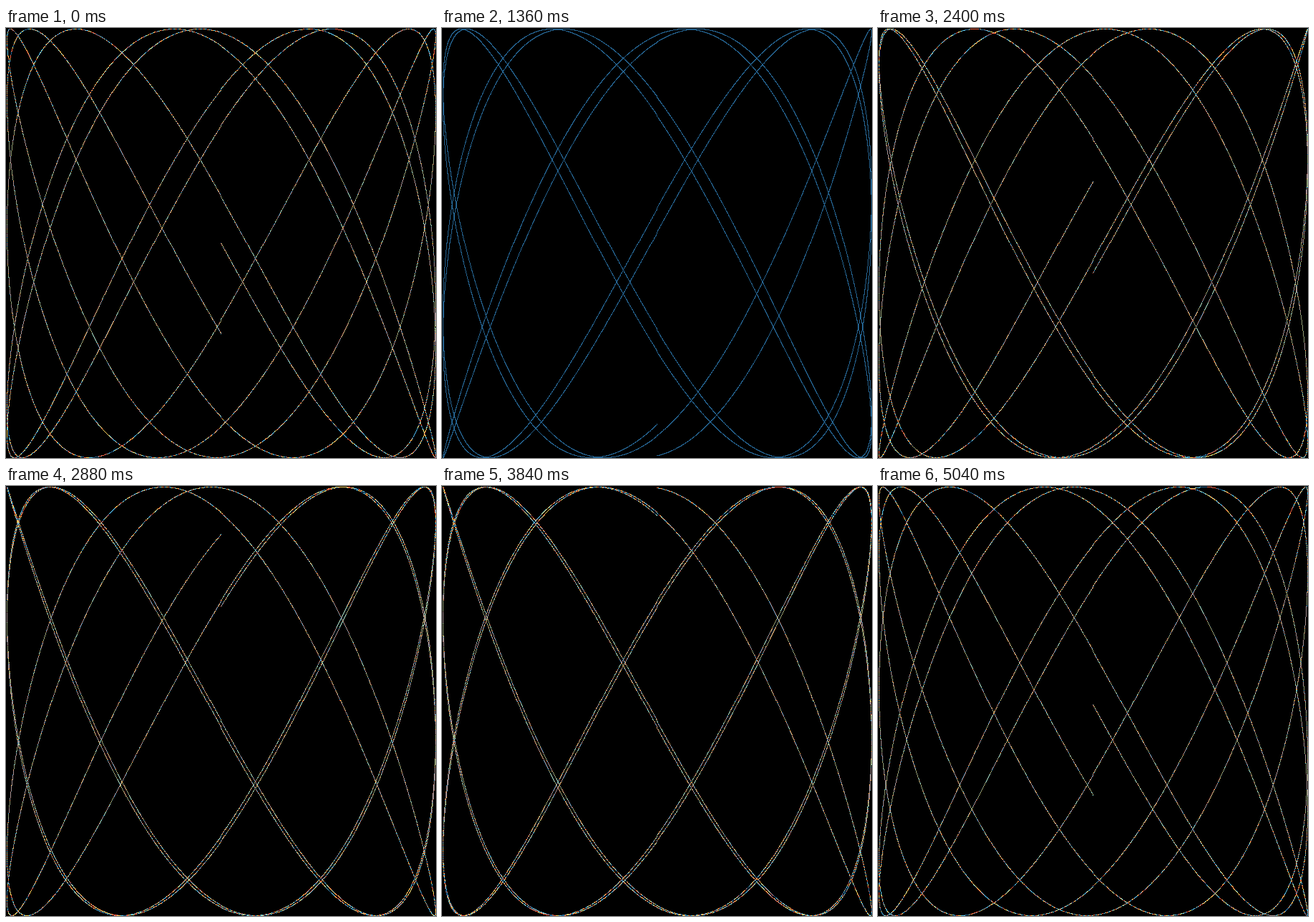
Animation of 601 by 601 pixels, one loop 5120 ms. Source, as an HTML page with a canvas:

```html
<!DOCTYPE html>
<html lang="en">
<head>
<meta charset="utf-8">
<title>Lissajous</title>
<style>
  html, body { margin: 0; width: 100%; height: 100%; overflow: hidden; background: #000; }
  canvas { display: block; }
</style>
</head>
<body>
<canvas id="stage" width="601" height="601"></canvas>
<script>
const SIZE = 300, SIDE = 2 * SIZE + 1;
const CYCLES = 5, RES = 0.001, FREQ = 1.8139808639388588;
const FRAMES = 64, DELAY = 80;

// Packed as ABGR for little-endian pixel writes
const abgr = (r, g, b) => (0xff000000 | b << 16 | g << 8 | r) >>> 0;
const BLACK = abgr(0, 0, 0);
const BLUE = abgr(36, 98, 143);
const MIXED = [BLUE, abgr(239, 91, 60), abgr(251, 211, 90), abgr(92, 200, 234)];

const ctx = document.getElementById("stage").getContext("2d");
const image = ctx.createImageData(SIDE, SIDE);
const pixels = new Uint32Array(image.data.buffer);
const toPixel = v => SIZE + Math.trunc(v * SIZE + 0.5);

function draw(frame) {
  const phase = frame * 0.1;
  const colors = frame % 3 === 0 ? MIXED : [BLUE];
  pixels.fill(BLACK);
  for (let t = 0, step = 0; t < CYCLES * 2 * Math.PI; t += RES, step++) {
    const x = toPixel(Math.sin(t));
    const y = toPixel(Math.sin(t * FREQ + phase));
    pixels[y * SIDE + x] = colors[step % colors.length];
  }
  ctx.putImageData(image, 0, 0);
}

let shown = 0;
const start = performance.now();

function tick() {
  const frame = Math.floor((performance.now() - start) / DELAY) % FRAMES;
  if (frame !== shown) draw(shown = frame);
  requestAnimationFrame(tick);
}

draw(shown);
requestAnimationFrame(tick);
</script>
</body>
</html>
```
